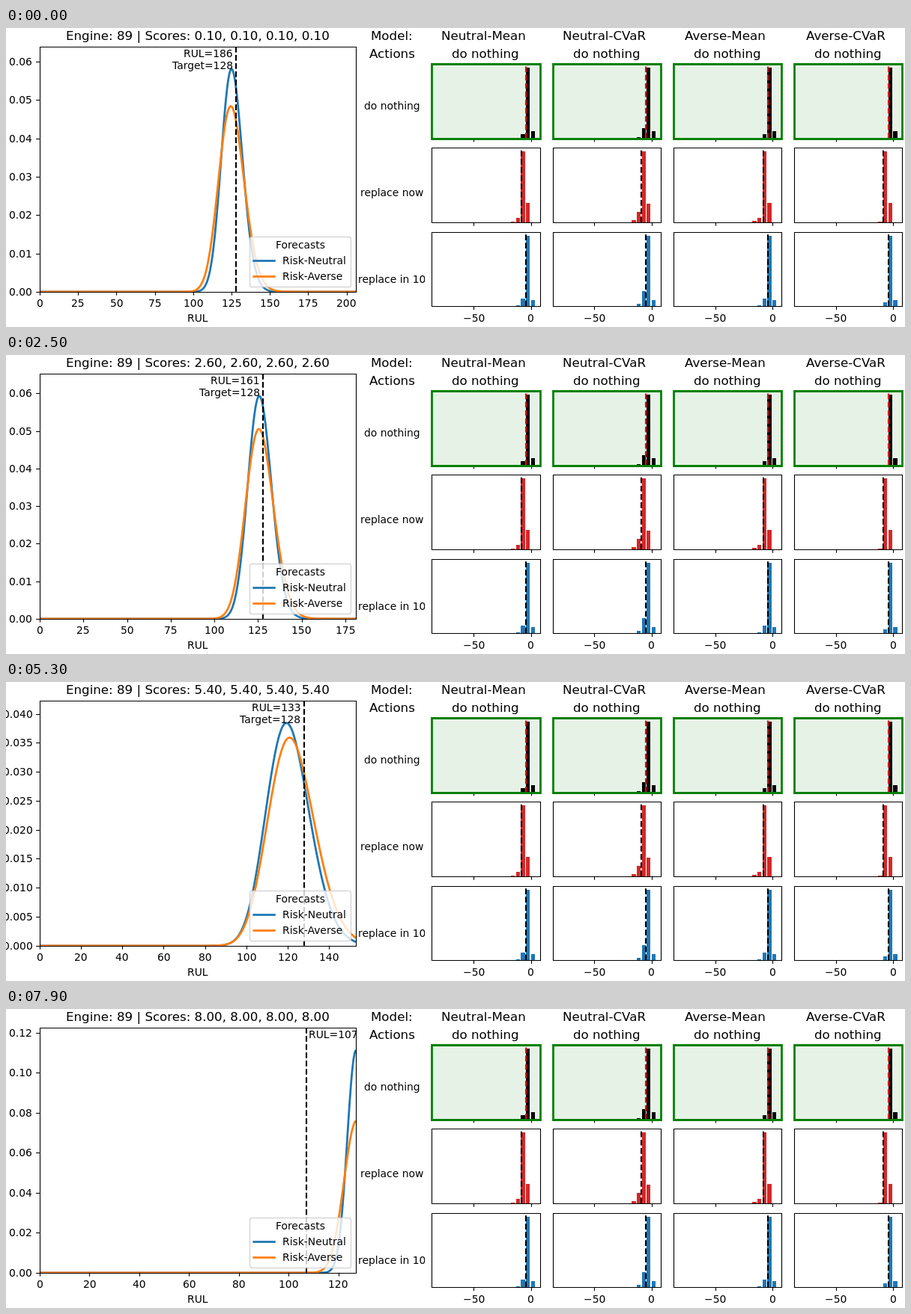
These frames come from a looping animation (1200x400 px, 8 s). An HTML page with a canvas:

```html
<!DOCTYPE html>
<html lang="en">
<head>
<meta charset="utf-8">
<title>RUL forecasts</title>
<style>
html, body { margin: 0; width: 100%; height: 100%; overflow: hidden; background: #fff; }
canvas { display: block; }
</style>
</head>
<body>
<canvas id="stage" width="1200" height="400"></canvas>
<script>
const ctx = document.getElementById('stage').getContext('2d');
const STEP = 100, STEPS = 80, FIRST_RUL = 186, TARGET = 128;
const BLUE = '#1f77b4', ORANGE = '#ff7f0e', RED = '#d62728', GREEN = '#008000';
const SMALL = 13.89, LARGE = 16.67, TICK = 4.86, THIN = 1.11, THICK = 2.78;
const plot = { left: 45, right: 467, top: 25, bottom: 352.8 };
plot.width = plot.right - plot.left;
plot.height = plot.bottom - plot.top;

// step, then mode and peak density of the neutral and the averse forecast
const forecasts = [
  [0, 125, .0581, 124.5, .0484],
  [8, 122, .0402, 120.4, .0325],
  [12, 121.6, .0399, 120, .0319],
  [25, 125.7, .0593, 125.5, .0505],
  [33, 126.1, .0726, 127.1, .0613],
  [44, 114.4, .0323, 118.4, .031],
  [55, 120.5, .0398, 121.5, .037],
  [62, 124.7, .0581, 124.5, .0465],
  [79, 127.1, .1115, 127.4, .0763]
];

// bar heights by row and column; the last entry sits in the rightmost bin
const holdLines = [126, 124.6, 126.5, 126.3];
const rows = [
  { label: 'do nothing', labelY: 109, color: '#000', line: '#f00', lastBin: 1,
    bars: [[6, 95, 10], [2, 14, 95, 10], [6, 95, 10], [95, 10]], lines: holdLines },
  { label: 'replace now', labelY: 225, color: RED, line: '#000', lastBin: 0,
    bars: [[1, 6, 95, 26], [3, 14, 95, 25], [2, 6, 95, 26], [1, 95, 26]],
    lines: [120, 118.7, 120.3, 119] },
  { label: 'replace in 10', labelY: 341, color: BLUE, line: '#000', lastBin: 1,
    bars: [[1, 10, 94, 8], [3, 20, 94, 8], [1, 10, 94, 8], [5, 94, 8]], lines: holdLines }
];
const models = ['Neutral-Mean', 'Neutral-CVaR', 'Averse-Mean', 'Averse-CVaR'];

// aligns a stroke with the pixel grid
const snap = (v, width) => Math.round(v) + (Math.round(width) % 2) / 2;

// text starts on whole pixels; align is the share of its width left of x
function text(str, x, y, size = SMALL, align = .5) {
  ctx.font = `${size}px "DejaVu Sans", sans-serif`;
  ctx.fillStyle = '#000';
  ctx.fillText(str, Math.round(x - align * ctx.measureText(str).width), Math.round(y));
}

function stroke(color, width) {
  ctx.strokeStyle = color;
  ctx.lineWidth = width;
  ctx.stroke();
}

function vertical(x, y1, y2, color = '#000', width = THIN) {
  ctx.beginPath();
  ctx.moveTo(snap(x, width), y1);
  ctx.lineTo(snap(x, width), y2);
  stroke(color, width);
}

function horizontal(x1, x2, y, color = '#000', width = THIN) {
  ctx.beginPath();
  ctx.moveTo(x1, snap(y, width));
  ctx.lineTo(x2, snap(y, width));
  stroke(color, width);
}

function dashed(x, bottom, top, color) {
  ctx.setLineDash([7.71, 3.33]);
  vertical(x, bottom, top, color, 2.08);
  ctx.setLineDash([]);
}

function frame(x, y, w, h, color = '#000', width = THIN) {
  const left = snap(x, width), top = snap(y, width);
  ctx.beginPath();
  ctx.rect(left, top, snap(x + w, width) - left, snap(y + h, width) - top);
  stroke(color, width);
}

function clipped(x, y, w, h, draw) {
  ctx.save();
  ctx.beginPath();
  ctx.rect(x, y, w, h);
  ctx.clip();
  draw();
  ctx.restore();
}

// smallest round step giving at most nine intervals
function tickStep(max) {
  const unit = 10 ** Math.floor(Math.log10(max / 9));
  return [1, 2, 2.5, 5, 10].map(m => m * unit).find(s => max / s <= 9);
}

function forecastAt(step) {
  const i = Math.max(1, forecasts.findIndex(f => f[0] >= step));
  const a = forecasts[i - 1], b = forecasts[i];
  const k = (step - a[0]) / (b[0] - a[0]);
  return a.map((v, j) => v + (b[j] - v) * k);
}

// log-normal density with the given mode and height
function density(mode, peak) {
  const s = 1 / (Math.sqrt(2 * Math.PI) * peak * mode);
  return x => {
    if (x <= 0) return 0;
    const z = Math.log(x / mode) / s;
    return peak * Math.exp(-z * z / 2);
  };
}

function drawLegend() {
  ctx.beginPath();
  ctx.roundRect(325.5, 279.5, 135, 67, 3);
  ctx.fillStyle = 'rgba(255,255,255,.8)';
  ctx.fill();
  stroke('rgba(204,204,204,.8)', 1.39);
  text('Forecasts', 392.5, 295);
  [['Risk-Neutral', BLUE, 311], ['Risk-Averse', ORANGE, 332]].forEach(([name, color, y]) => {
    horizontal(329.4, 359.8, y, color, THICK);
    text(name, 369, y + 5, SMALL, 0);
  });
}

function drawForecast(step) {
  const rul = FIRST_RUL - step, xMax = rul + 20;
  const [, modeN, peakN, modeA, peakA] = forecastAt(step);
  const curves = [[density(modeN, peakN), BLUE], [density(modeA, peakA), ORANGE]];
  let peak = 0;
  for (let x = 0; x <= xMax; x += .25) {
    for (const [f] of curves) peak = Math.max(peak, f(x));
  }
  const yMax = peak * 1.1;
  const px = x => plot.left + x / xMax * plot.width;
  const py = y => plot.bottom - y / yMax * plot.height;
  const lineX = px(Math.min(rul, TARGET));

  clipped(plot.left, plot.top, plot.width, Math.round(plot.height), () => {
    ctx.lineJoin = 'round';
    for (const [f, color] of curves) {
      ctx.beginPath();
      for (let x = 0; x <= xMax; x += .5) ctx.lineTo(px(x), py(f(x)));
      stroke(color, THICK);
    }
    dashed(lineX, plot.bottom, plot.top);
  });

  const xStep = tickStep(xMax);
  for (let x = 0; x <= xMax; x += xStep) {
    vertical(px(x), plot.bottom, plot.bottom + TICK);
    text(String(x), px(x), 373);
  }
  const yStep = tickStep(yMax);
  const digits = yMax < .0225 ? 4 : yMax < .045 ? 3 : 2;
  for (let i = 0; i * yStep <= yMax; i++) {
    const y = py(i * yStep);
    horizontal(plot.left - TICK, plot.left, y);
    text((i * yStep).toFixed(digits), 35.3, y + 5, SMALL, 1);
  }
  frame(plot.left, plot.top, plot.width, plot.height);

  clipped(0, 0, 476, 400, () => {
    if (rul > TARGET) {
      text('RUL=' + rul, lineX - 4.6, 39, SMALL, 1);
      text('Target=' + TARGET, lineX - 4.6, 55, SMALL, 1);
    } else {
      text('RUL=' + rul, lineX + 3.4, 39, SMALL, 0);
    }
  });
  drawLegend();
  text('RUL', 256, 393);
  const score = ((step + 1) / 10).toFixed(2);
  text(`Engine: 89 | Scores: ${Array(4).fill(score).join(', ')}`, 256, 16, LARGE);
}

function drawPanel(row, r, c) {
  const x = 568.4 + c * 161.2, y = 48.1 + r * 112.3, w = 144.4, h = 99.5;
  const bottom = y + h, base = Math.round(bottom), bars = row.bars[c];
  if (r === 0) {
    ctx.fillStyle = '#e6f2e6';
    ctx.fillRect(x, y, w, h);
  }
  ctx.fillStyle = row.color;
  bars.forEach((height, i) => {
    const bin = row.lastBin - (bars.length - 1 - i);
    const left = x + 125.6 + bin * 6.65, start = Math.round(left);
    ctx.fillRect(start, base - height, Math.round(left + 5.3) - start, height);
  });
  dashed(x + row.lines[c], bottom, y, row.line);
  for (const [value, tx] of [['−50', x + 55.9], ['0', x + 132.3]]) {
    vertical(tx, bottom, bottom + TICK);
    if (r === 2) text(value, tx, 393);
  }
  if (r === 0) frame(x, y, w, h, GREEN, THICK);
  else frame(x, y, w, h);
}

function drawActions() {
  text('Model:', 515, 16, LARGE);
  text('Actions', 515, 40, LARGE);
  clipped(469, 0, 90, 400, () => rows.forEach(r => text(r.label, 515, r.labelY)));
  models.forEach((name, c) => {
    const center = 640.2 + c * 161.2;
    text(name + ' ', center, 16, LARGE);
    text('do nothing', center, 40, LARGE);
    rows.forEach((row, r) => drawPanel(row, r, c));
  });
}

function render(now) {
  ctx.fillStyle = '#fff';
  ctx.fillRect(0, 0, 1200, 400);
  drawForecast(Math.floor(now / STEP) % STEPS);
  drawActions();
}

let start;
function tick(now) {
  start ??= now;
  render(Math.max(0, now - start));
  requestAnimationFrame(tick);
}
render(0);
requestAnimationFrame(tick);
</script>
</body>
</html>
```
